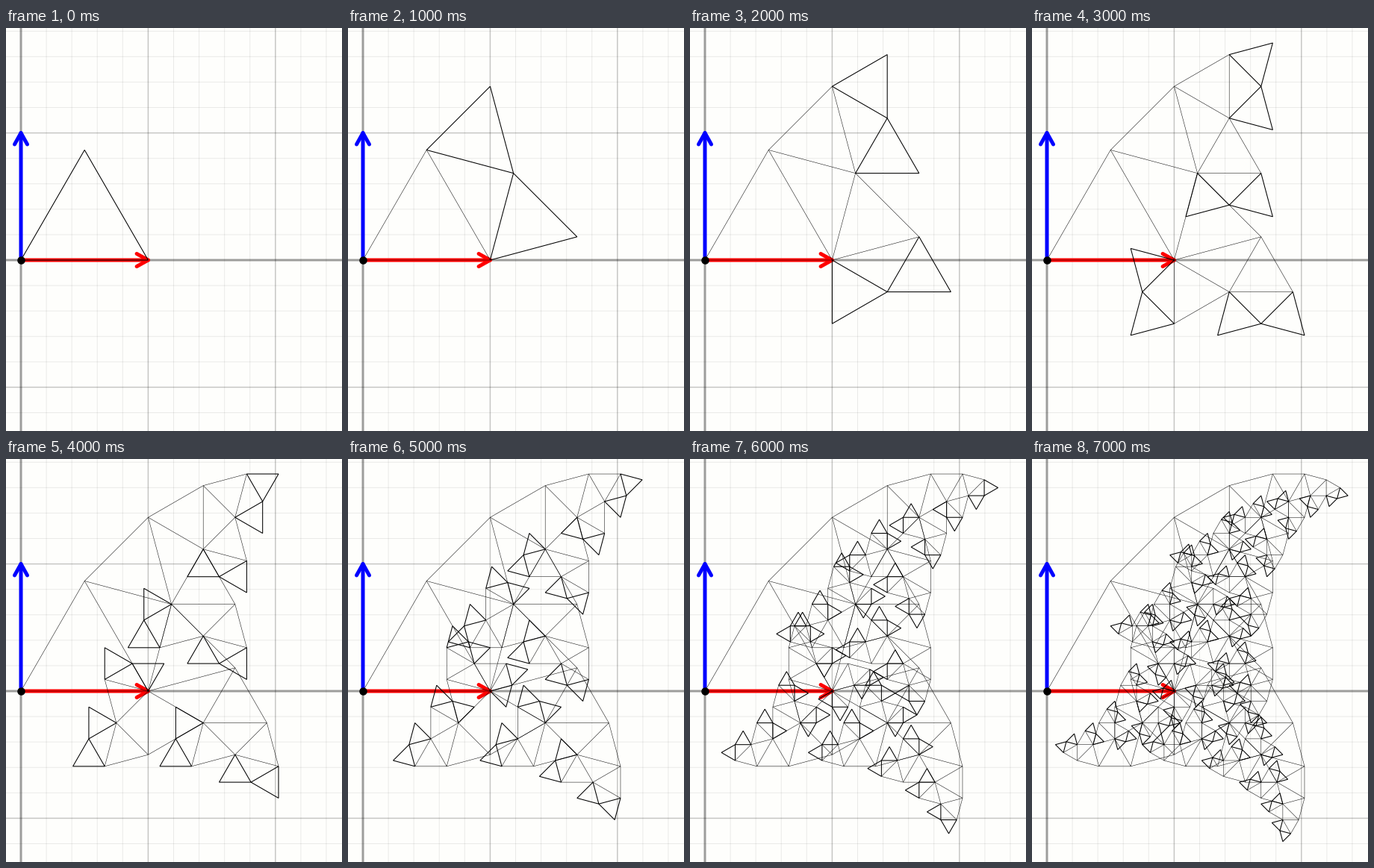
A matplotlib script for the animation above (8000 ms loop, 450x540 px).

```python
import numpy as np
import matplotlib
import matplotlib.pyplot as plt
from matplotlib.animation import FuncAnimation
from matplotlib.collections import PolyCollection

matplotlib.rcParams["path.snap"] = False

W, H, DPI = 450, 540, 72          # at 72 dpi one point is one pixel
OX, OY, UNIT = 20, 311, 170.4
LEVELS = 8

fig = plt.figure(figsize=(W / DPI, H / DPI), dpi=DPI, facecolor="#fefefc")
ax = fig.add_axes([0, 0, 1, 1])
ax.set(xlim=(0, W), ylim=(H, 0))
ax.axis("off")


def to_px(z):
    """Complex plane to stage pixels."""
    z = np.asarray(z)
    return np.stack([OX + UNIT * z.real, OY - UNIT * z.imag], axis=-1)


def stroke(points, color, width, z, **kw):
    xy = to_px(points)
    ax.plot(xy[:, 0], xy[:, 1], color=color, lw=width, zorder=z, **kw)


def draw_grid():
    for k in range(-7, 14):
        if k == 0:
            style = ("black", 3, 1, 0.38)
        elif k % 5 == 0:
            style = ("black", 1.5, 1, 0.22)
        else:
            style = ("black", 1, 1, 0.08)
        color, width, z, alpha = style
        s = k / 5
        stroke([s - 3j, s + 3j], color, width, z, alpha=alpha)
        stroke([-1 + s * 1j, 4 + s * 1j], color, width, z, alpha=alpha)


def draw_arrow(tip, color):
    caps = dict(solid_capstyle="round", solid_joinstyle="round")
    stroke([0, tip], color, 5, 2, **caps)
    barbs = [tip * (0.91 + 0.05j), tip, tip * (0.91 - 0.05j)]
    stroke(barbs, color, 5, 2, **caps)


# Each triangle spawns two copies, shrunk by sqrt(2) and turned.
APEX = np.exp(1j * np.pi / 3)
TURN_A = np.exp(-1j * np.pi / 12) / np.sqrt(2)
TURN_B = np.exp(-7j * np.pi / 12) / np.sqrt(2)
SHARED = APEX + TURN_A


def grow():
    """Corner arrays of the triangles, one array per level."""
    base, turn = np.array([0j]), np.array([1 + 0j])
    levels = []
    for _ in range(LEVELS):
        corners = np.stack([base, base + turn, base + turn * APEX], axis=1)
        levels.append(to_px(corners))
        base = np.concatenate([base + turn * APEX, base + turn * SHARED])
        turn = np.concatenate([turn * TURN_A, turn * TURN_B])
    return levels


def outlines(width, z):
    group = PolyCollection([], facecolors="none", edgecolors="black",
                           linewidths=width, joinstyle="miter", zorder=z)
    ax.add_collection(group, autolim=False)
    return group


draw_grid()
draw_arrow(1j, "#0000ff")
draw_arrow(1 + 0j, "#ff0000")
ax.plot([OX], [OY], "o", color="black", ms=10.5, mew=0, zorder=5)

levels = grow()
older = outlines(0.5, 3)
newest = outlines(1.05, 4)


def update(n):
    older.set_verts(np.concatenate(levels[:n]) if n else [])
    newest.set_verts(levels[n])
    return older, newest


anim = FuncAnimation(fig, update, frames=LEVELS, interval=1000,
                     repeat=True, repeat_delay=0)
plt.show()
```
